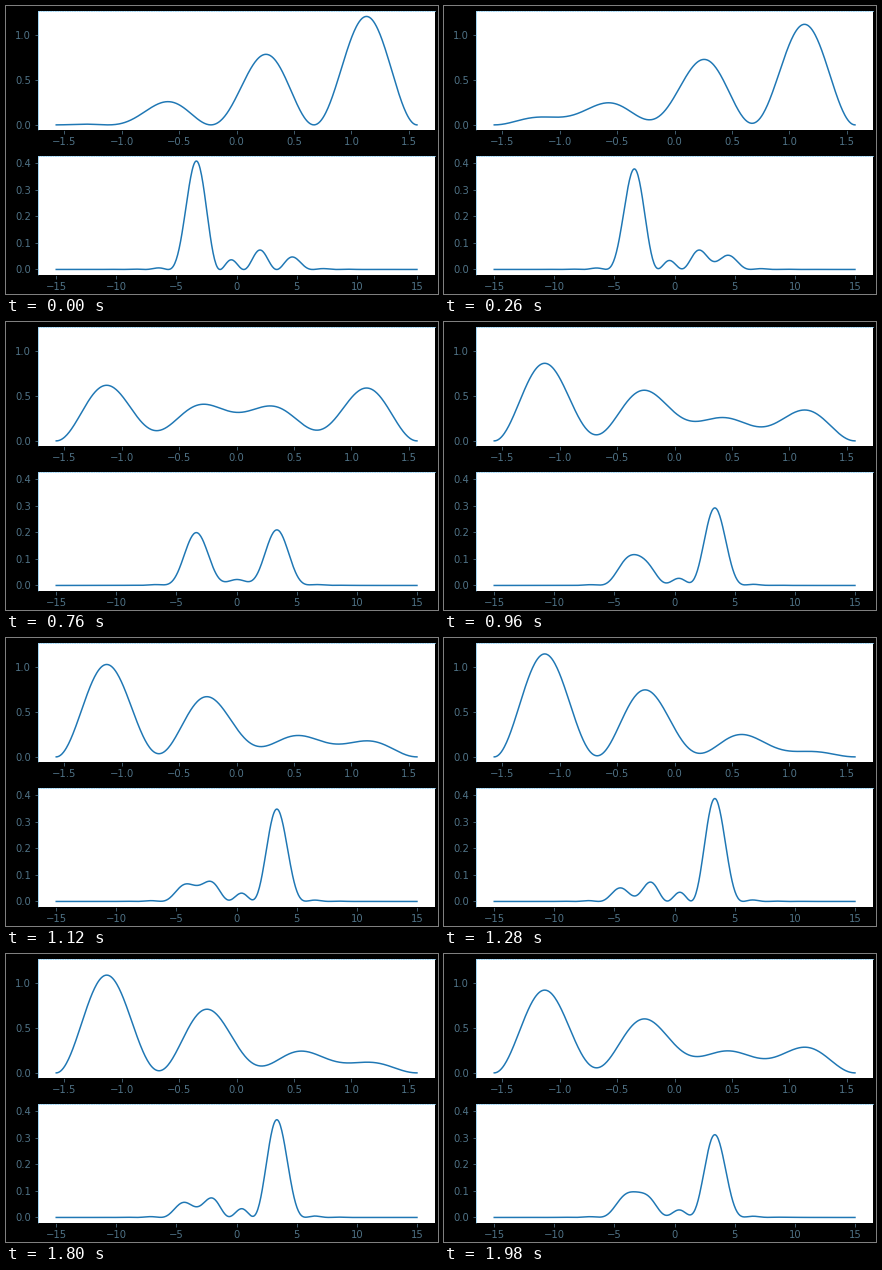
Recreate the animation shown at these times as a matplotlib script. Size 432x288 px, loop 2000 ms.

```python
import numpy as np
import matplotlib.pyplot as plt
from matplotlib.animation import FuncAnimation

W, H, DPI = 432, 288, 72
FRAMES, INTERVAL = 100, 20
PHASE_STEP = 0.042
LABEL = "#4f7286"
EDGE = "#8fcdf2"

plt.rcParams["font.family"] = "DejaVu Sans"

fig = plt.figure(figsize=(W / DPI, H / DPI), dpi=DPI, facecolor="black")


def make_axes(top, bottom):
    left, right = 32.2, 429
    ax = fig.add_axes([left / W, 1 - bottom / H,
                       (right - left) / W, (bottom - top) / H])
    ax.tick_params(colors=LABEL, labelsize=10)
    ax.spines["left"].set_color(EDGE)
    ax.spines["top"].set(color=EDGE, linestyle=(0, (1.5, 1.5)))
    return ax


def lobe(k):
    """Integral of cos(kx) over the well."""
    return np.pi / 2 * np.sinc(k / 2)


# Third and fourth eigenstates of a box of width pi, in position and momentum.
x = np.linspace(-np.pi / 2, np.pi / 2, 500)
p = np.linspace(-15, 15, 500)
root = np.sqrt(1 / np.pi)
pos = [root * np.sin(n * (np.pi / 2 - x)) for n in (3, 4)]
scale = 1 / (np.pi * np.sqrt(2))
mom = [scale * (lobe(3 - p) + lobe(3 + p)),
       -scale * (lobe(4 - p) - lobe(4 + p))]


def density(states, phase):
    a, b = states
    return a**2 + b**2 + 2 * a * b * np.cos(phase)


ax_pos = make_axes(5, 124.3)
ax_mom = make_axes(149.6, 268.9)
line_pos, = ax_pos.plot(x, density(pos, 0), color="#1f77b4", lw=1.5)
line_mom, = ax_mom.plot(p, density(mom, 0), color="#1f77b4", lw=1.5)

# Keep the limits of the opening state for the whole loop.
for ax in (ax_pos, ax_mom):
    ax.set_ylim(ax.get_ylim())


def update(i):
    phase = PHASE_STEP * i
    line_pos.set_ydata(density(pos, phase))
    line_mom.set_ydata(density(mom, phase))
    return line_pos, line_mom


anim = FuncAnimation(fig, update, frames=FRAMES, interval=INTERVAL,
                     repeat=True, repeat_delay=0)
plt.show()
```
